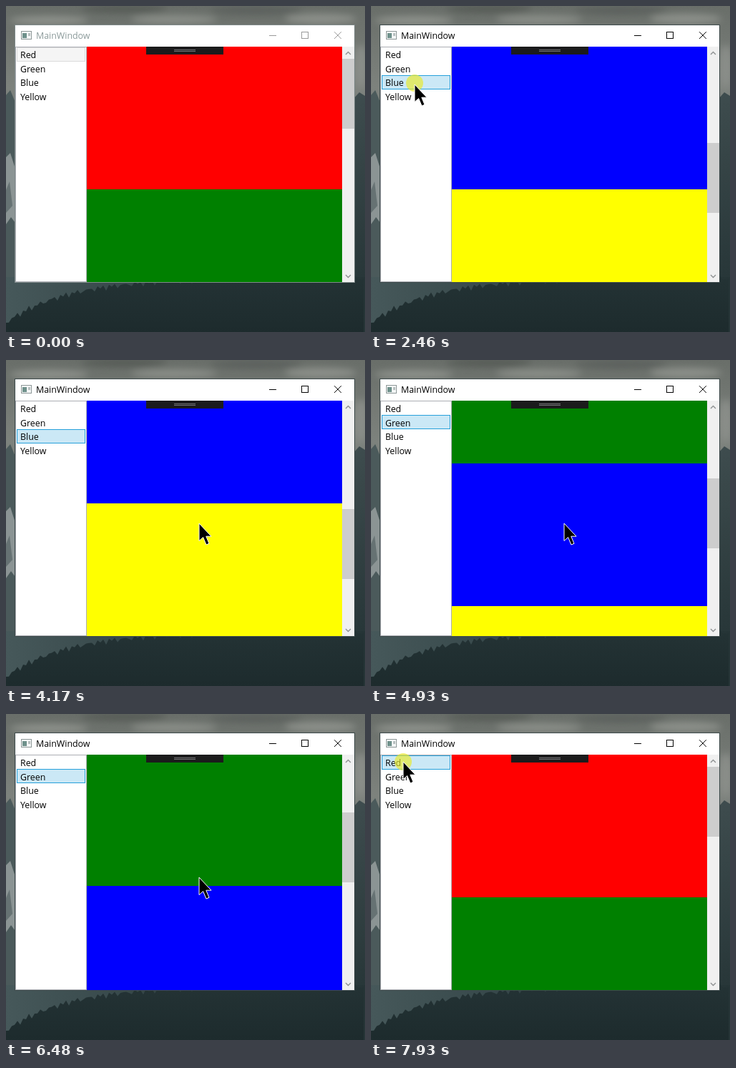
An HTML page that plays this animation: 502 px wide and 457 px high, repeating every 8000 ms.

```html
<!DOCTYPE html>
<html lang="en">
<head>
<meta charset="utf-8">
<title>MainWindow</title>
<style>
  html, body { margin: 0; width: 100%; height: 100%; overflow: hidden; background: #243335; }
  svg { display: block; width: 502px; height: 457px; }
  text { font: 12.4px "Open Sans", "Noto Sans", sans-serif; }
  .crisp { shape-rendering: crispEdges; }
  .chrome { fill: none; stroke: #000; }
  .inactive .chrome { stroke: #999; }
  .inactive .title { fill: #8b9a9a; }
  .frame { fill: #fff; stroke: #3d4a4b; }
  .inactive .frame { stroke: #7f8a8a; }
  .row { fill: none; stroke: none; }
  .row.hover { fill: #e5f3fb; stroke: #70c0e7; }
  .row.selected { fill: #cbe8f6; stroke: #26a0da; }
  .inactive .row.selected, .row.dim { fill: #f5f5f5; stroke: #dadada; }
</style>
</head>
<body>
<svg viewBox="0 0 502 457">
  <defs>
    <linearGradient id="sky" x2="0" y2="1">
      <stop offset="0" stop-color="#696e69"/>
      <stop offset=".25" stop-color="#7d827d"/>
      <stop offset=".6" stop-color="#656d6b"/>
      <stop offset="1" stop-color="#425150"/>
    </linearGradient>
    <linearGradient id="cliff" x2="0" y2="1">
      <stop offset="0" stop-color="#3e4c4e"/>
      <stop offset="1" stop-color="#263537"/>
    </linearGradient>
    <linearGradient id="valley" x2="1" y2="0">
      <stop offset="0" stop-color="#46585a"/>
      <stop offset=".5" stop-color="#304143"/>
      <stop offset="1" stop-color="#253436"/>
    </linearGradient>
    <linearGradient id="woods" x2="0" y2="1">
      <stop offset="0" stop-color="#243335"/>
      <stop offset="1" stop-color="#1d2b2d"/>
    </linearGradient>
    <filter id="soft" x="-30%" y="-100%" width="160%" height="300%"><feGaussianBlur stdDeviation="5"/></filter>
    <clipPath id="view"><rect x="113" y="57" width="357" height="330"/></clipPath>
  </defs>

  <!-- desktop -->
  <rect width="502" height="457" fill="url(#sky)"/>
  <g filter="url(#soft)">
    <ellipse cx="60" cy="20" rx="55" ry="6" fill="#8d918b"/>
    <ellipse cx="165" cy="4" rx="60" ry="6" fill="#565b57"/>
    <ellipse cx="235" cy="19" rx="60" ry="6" fill="#8a8e88"/>
    <ellipse cx="350" cy="6" rx="65" ry="6" fill="#5c615d"/>
    <ellipse cx="440" cy="18" rx="50" ry="7" fill="#8b8f89"/>
    <ellipse cx="496" cy="85" rx="10" ry="30" fill="#898d88"/>
  </g>
  <path d="M0 125 L6 118 13 135V400H0z" fill="#4b5a5b"/>
  <path d="M0 212 L6 206 13 228V304L7 296 0 306z" fill="#8b9494"/>
  <path d="M0 258 L5 246 9 280 0 290z" fill="#667273"/>
  <path d="M486 130 L494 121 502 126V400H486z" fill="url(#cliff)"/>
  <rect y="380" width="502" height="77" fill="url(#valley)"/>
  <path id="trees" fill="url(#woods)"/>

  <!-- window -->
  <g id="win" class="inactive">
    <rect class="frame crisp" x="12.5" y="26.5" width="475" height="361"/>
    <g class="crisp">
      <rect x="21.5" y="35.5" width="14" height="11" fill="#f4f6f6" stroke="#8d9797"/>
      <rect x="23" y="38" width="6" height="7" fill="#6f918b"/>
      <rect x="31" y="38" width="3" height="4" fill="#b7c0c0"/>
    </g>
    <text class="title" x="42" y="46">MainWindow</text>
    <path class="chrome crisp" d="M368 41.5h10M413.5 36.5h9v9h-9z"/>
    <path class="chrome" d="M459 36.2l9.8 9.8M468.8 36.2l-9.8 9.8"/>

    <rect class="crisp" x="13.5" y="57.5" width="99" height="329" fill="#fff" stroke="#abadb3"/>
    <g id="list"></g>

    <g clip-path="url(#view)">
      <g id="bands" class="crisp">
        <rect x="113" y="57" width="357" height="200" fill="#f00"/>
        <rect x="113" y="257" width="357" height="200" fill="#008000"/>
        <rect x="113" y="457" width="357" height="200" fill="#00f"/>
        <rect x="113" y="657" width="357" height="400" fill="#ff0"/>
      </g>
    </g>
    <rect x="470" y="57" width="17" height="330" fill="#f0f0f0"/>
    <rect id="thumb" class="crisp" x="470" y="74" width="17" height="98" fill="#cdcdcd"/>
    <path d="M475 68l3.5-3.5 3.5 3.5M475 377l3.5 3.5 3.5-3.5" fill="none" stroke="#8e9192" stroke-width="1.4"/>
    <g class="crisp">
      <rect x="196" y="57" width="108" height="11" fill="#1b1b1c"/>
      <path d="M235 61.5h30M235 63.5h30" stroke="#77777a"/>
    </g>
  </g>

  <circle id="press" r="12" fill="#e9e928" opacity=".66"/>
  <path id="cursor" d="M0 0V24.5L5.6 19.5 10 30 14 28.3 9.8 18.2H17z" fill="#000" stroke="#fff"/>
</svg>
<script>
const LOOP = 8000, TICK = 76, ROW = 19.5;
const $ = id => document.getElementById(id);

// Pointer moves: start, end, from x, y, to x, y
const moves = [
  [220, 980, 409, 381, 42, 84],
  [994, 1220, 42, 84, 43, 87],
  [1374, 1450, 43, 87, 45, 87],
  [1694, 2385, 45, 87, 61, 110],
  [2534, 2840, 61, 110, 53, 128],
  [3084, 3620, 53, 128, 270, 230],
  [3694, 3770, 270, 230, 270, 229],
  [7104, 7855, 270, 229, 45, 67]
];

// Button presses: start, end, x, y
const presses = [
  [1450, 1600, 43, 84],
  [2460, 2540, 61, 108],
  [3010, 3160, 53, 128],
  [7930, 8000, 45, 67]
];

// Scroll offsets: three list clicks, wheel notches of 48, then a last click
const scrolls = [[0, 0], [1530, 200], [2460, 400], [3010, 600]];
const wheel = (dir, ...times) => times.forEach(t => scrolls.push([t, scrolls.at(-1)[1] + dir * 48]));
wheel(-1, 3940, 4020, 4170, 4700, 4780, 4930, 5330, 5480, 5560, 5635, 5710);
wheel(1, 6320, 6400, 6480, 6780, 6860);
scrolls.push([7930, 0]);

const rows = ["Red", "Green", "Blue", "Yellow"].map((name, i) => {
  const top = Math.round(58.5 + i * ROW);
  $("list").insertAdjacentHTML("beforeend",
    `<rect class="row crisp" x="15.5" y="${top - .5}" width="95" height="19"/>
     <text x="20" y="${Math.round(73 + i * ROW)}">${name}</text>`);
  return $("list").querySelectorAll("rect")[i];
});

function drawTrees() {
  let d = "M0 457";
  for (let x = 0; x <= 502; x += 4) {
    const ridge = 444 - 62 * (1 - Math.exp(-x / 85));
    d += `L${x} ${(ridge + 3 * Math.sin(x * 2.3) + 2 * Math.sin(x * .37)).toFixed(1)}`;
  }
  $("trees").setAttribute("d", d + "V457z");
}

function pointerAt(t) {
  const m = moves.findLast(m => t >= m[0]);
  if (!m) return null;
  const [a, b, x0, y0, x1, y1] = m;
  const n = Math.round((b - a) / TICK);
  const p = Math.min(1, Math.floor((t - a) / (b - a) * n + .02) / n);
  const e = p * p * (3 - 2 * p);
  return [Math.round(x0 + (x1 - x0) * e), Math.round(y0 + (y1 - y0) * e)];
}

const place = (el, pos) => {
  el.style.display = pos ? "" : "none";
  if (pos) el.setAttribute("transform", `translate(${pos[0]} ${pos[1]})`);
};

function draw(now) {
  const t = now % LOOP;
  const offset = scrolls.findLast(s => t >= s[0])[1];
  const pos = pointerAt(t);
  const press = presses.find(p => t >= p[0] && t < p[1]);
  const hover = pos && pos[0] >= 15 && pos[0] < 111 ? Math.floor((pos[1] - 58.5) / ROW) : -1;
  const selected = Math.floor(offset / 200);

  $("win").classList.toggle("inactive", t < 1450);
  $("bands").setAttribute("transform", `translate(0 ${-offset})`);
  $("thumb").setAttribute("y", Math.round(74 + offset * .296));
  rows.forEach((row, i) => {
    row.classList.toggle("selected", i === selected);
    row.classList.toggle("dim", i === selected && t < 1530);
    row.classList.toggle("hover", i === hover);
  });
  place($("cursor"), pos);
  place($("press"), press && press.slice(2));
  requestAnimationFrame(draw);
}

drawTrees();
const start = performance.now();
const loop = () => draw(Math.max(0, performance.now() - start));
requestAnimationFrame(function tick(now) { draw(now); });
</script>
</body>
</html>
```
